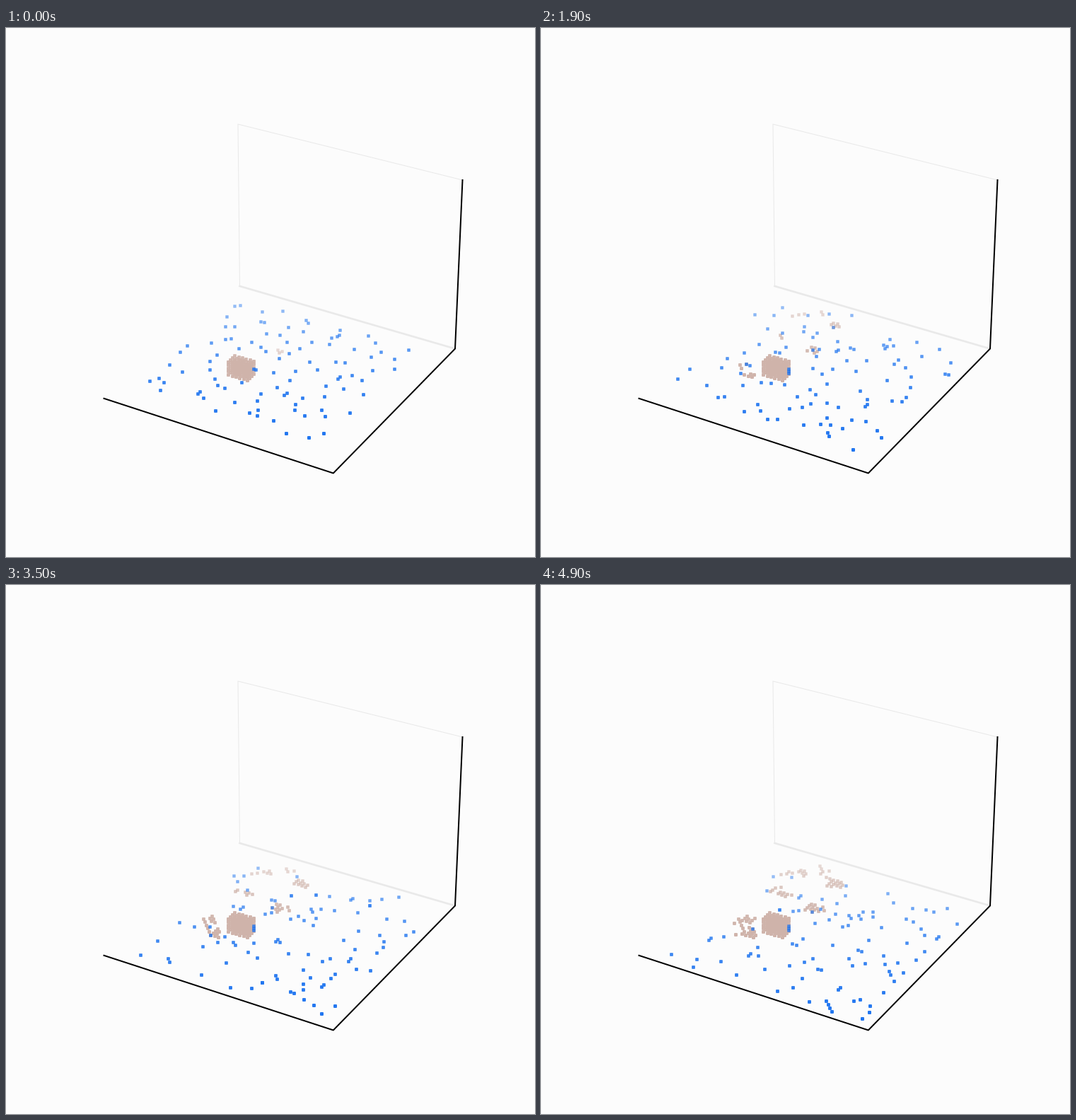
These frames come from a looping animation (748 by 748 pixels, 5 s). A matplotlib script:

```python
import numpy as np
import matplotlib.pyplot as plt
from matplotlib.animation import FuncAnimation
from matplotlib.colors import to_rgb

SIZE, FRAMES, INTERVAL = 748, 50, 100
BACKGROUND, BLUE, BROWN = "#fcfcfc", "#2176f0", "#cfb3aa"
CELLS = 58
BLOCK_CENTRE, BLOCK_RADIUS = np.array([332, 480]), 20

# Floor corners: back, right, front, left
BACK, RIGHT, FRONT, LEFT = np.array(
    [(330, 364.5), (634.5, 453), (462.3, 629), (138, 523.3)])
TOP_RIGHT, TOP_BACK = (645, 214.5), (327.5, 135.5)

# Clumps: x, y, first frame, final number of cells
CLUMPS = [
    (385, 454, -10, 13), (299, 491, 3, 14), (282, 482, 10, 12),
    (414, 424, 2, 15), (366, 406, 9, 10), (341, 437, 9, 7),
    (324, 432, 27, 4), (395, 400, 6, 5),
]


def floor_homography():
    """Matrix taking unit floor coordinates to stage pixels."""
    skew = BACK - RIGHT + FRONT - LEFT
    g, h = np.linalg.solve(np.column_stack([RIGHT - FRONT, LEFT - FRONT]), skew)
    a, d = RIGHT - BACK + g * RIGHT
    b, e = LEFT - BACK + h * LEFT
    return np.array([[a, b, BACK[0]], [d, e, BACK[1]], [g, h, 1]])


H = floor_homography()
H_INV = np.linalg.inv(H)


def project(cells):
    """Return pixel places and depths of floor cells."""
    p = np.column_stack([np.divide(cells, CELLS), np.ones(len(cells))]) @ H.T
    return p[:, :2] / p[:, 2:], p[:, 2]


def unproject(xy):
    """Return floor cells and depths of pixel places."""
    p = np.column_stack([xy, np.ones(len(xy))]) @ H_INV.T
    return CELLS * p[:, :2] / p[:, 2:], 1 / p[:, 2]


def hits_block(cells):
    offset = project(cells)[0] - BLOCK_CENTRE
    return np.hypot(*offset.T) < BLOCK_RADIUS


def build_block():
    """Voxels of the central block, with the depth of their floor cells."""
    i, j, k = (n.ravel() for n in np.mgrid[0:6, 0:4, 0:5])
    base = np.column_stack([323.5 + 5.3 * i - 3 * j,
                            481.5 + 1.5 * i + 2.85 * j])
    return base - np.column_stack([0 * k, 4.6 * k]), unproject(base)[1]


def grow_clumps():
    """Each clump spreads from its seed, one neighbouring cell at a time."""
    rng = np.random.default_rng(5)
    cells, births = [], []
    for x, y, start, count in CLUMPS:
        seed = np.round(unproject([(x, y)])[0][0]).astype(int)
        clump = [tuple(seed)]
        while len(clump) < count:
            parent = clump[rng.integers(len(clump))]
            cell = tuple(parent + rng.integers(-1, 2, 2))
            if cell not in clump:
                clump.append(cell)
        cells += clump
        births += list(np.linspace(start, FRAMES - 1, count))
    return project(cells) + (np.array(births),)


def walk():
    """Biased random walk on the floor grid, one step per frame."""
    rng = np.random.default_rng(12)
    grid = np.mgrid[0:10, 0:10].reshape(2, -1).T
    cells = 4 + np.floor(4.7 * (grid + rng.random(grid.shape))).astype(int)
    cells = cells[~hits_block(cells)]
    path = [cells]
    for _ in range(FRAMES - 1):
        du = rng.choice([-1, 0, 1], len(cells), p=[0.25, 0.34, 0.41])
        dv = rng.choice([-1, 0, 1], len(cells), p=[0.28, 0.34, 0.38])
        moved = np.clip(cells + np.column_stack([du, dv]), 3, [55, 56])
        cells = np.where(hits_block(moved)[:, None], cells, moved)
        path.append(cells)
    return path


block, block_depth = build_block()
deposits, deposit_depth, births = grow_clumps()
paths = walk()
# Walkers held against the right side of the block
waiting = np.column_stack([np.full(3, 350), np.linspace(482, 488, 3)])
waiting_depth = unproject(waiting)[1]

fig = plt.figure(figsize=(SIZE / 72, SIZE / 72), dpi=72, facecolor=BACKGROUND)
ax = fig.add_axes([0, 0, 1, 1])
# Whole coordinates fall on pixel centres
ax.set(xlim=(-0.5, SIZE - 0.5), ylim=(SIZE - 0.5, -0.5))
ax.axis("off")


def line(points, color, width):
    ax.plot(*zip(*points), color=color, lw=width, zorder=1,
            solid_joinstyle="round")


line([BACK, TOP_BACK, TOP_RIGHT], "#e9e9e9", 1)
line([BACK, RIGHT], "#e9e9e9", 2.6)
line([LEFT, FRONT, RIGHT, TOP_RIGHT], "black", 2)

brown_dots = ax.scatter([], [], s=9, marker="s", lw=2, zorder=2)
blue_dots = ax.scatter([], [], s=9, marker="s", lw=2, zorder=3)


def place(dots, xy, depth, color):
    """Show dots that fade from near to far."""
    rgba = np.ones((len(depth), 4))
    rgba[:, :3] = to_rgb(color)
    rgba[:, 3] = 1 - 0.7 * (depth - depth.min()) / np.ptp(depth)
    dots.set_offsets(xy)
    dots.set_facecolor(rgba)
    dots.set_edgecolor(rgba)


def update(frame):
    grown = births <= frame
    place(brown_dots, np.vstack([block, deposits[grown]]),
          np.concatenate([block_depth, deposit_depth[grown]]), BROWN)
    xy, depth = project(paths[frame])
    held = min(3, 1 + frame // 3)
    place(blue_dots, np.vstack([xy, waiting[:held]]),
          np.concatenate([depth, waiting_depth[:held]]), BLUE)
    return brown_dots, blue_dots


animation = FuncAnimation(fig, update, frames=FRAMES, interval=INTERVAL,
                          repeat=True, repeat_delay=0)
plt.show()
```
